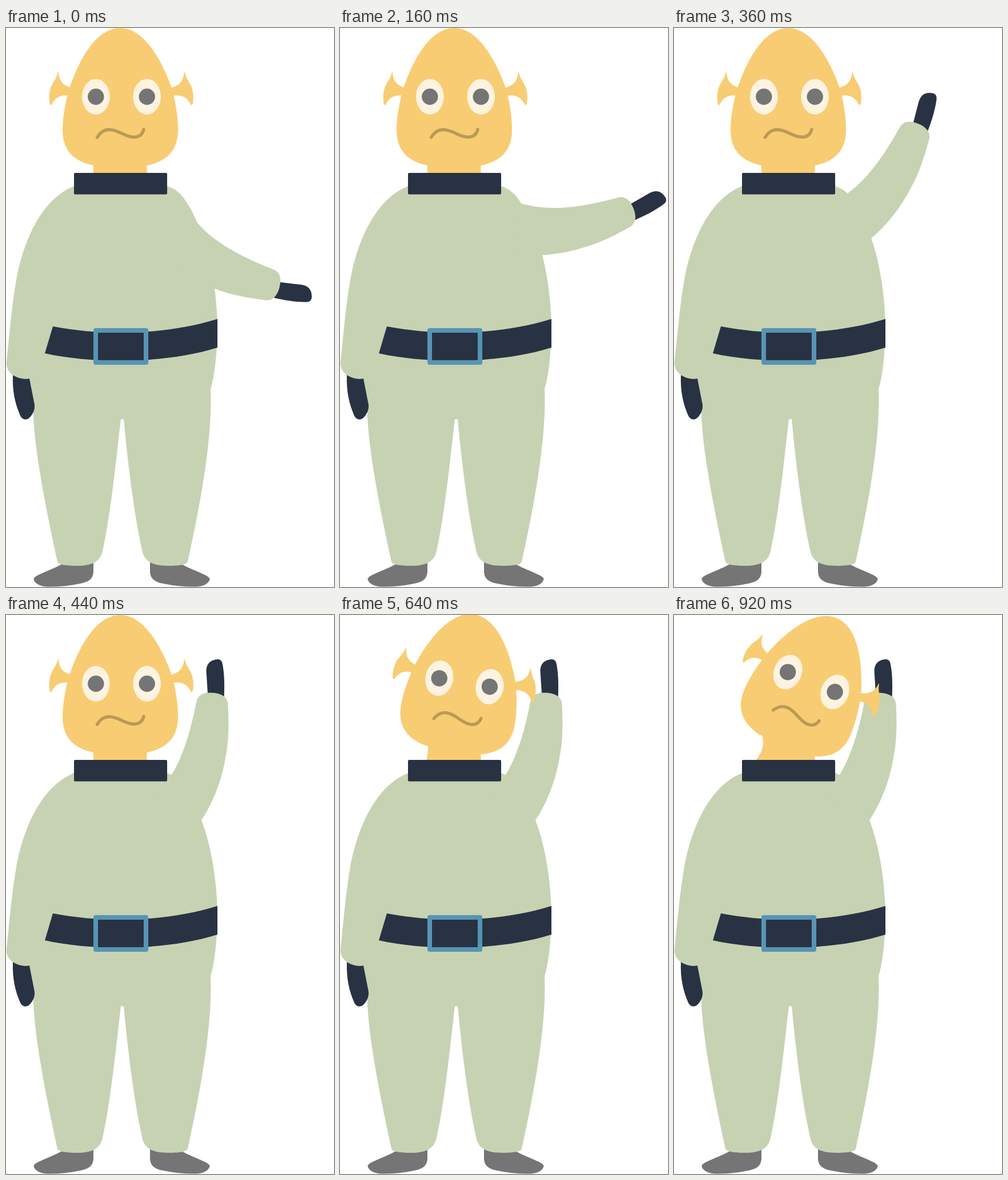
Write an HTML page that moves like this. It is 574 px wide and 976 px high and loops after 0.96 s.

```html
<!DOCTYPE html>
<html lang="en">
<head>
<meta charset="utf-8">
<title>Waving figure</title>
<style>
  html, body { margin: 0; width: 100%; height: 100%; overflow: hidden; background: #fff; }
  svg { display: block; width: 574px; height: 976px; }
  .suit { fill: #c7d2b3; }
  .navy { fill: #293243; }
  .skin { fill: #f8cc72; }
  .grey { fill: #757575; }
  .white { fill: #fdf3e1; }
  .buckle { fill: #293243; stroke: #5695b3; stroke-width: 8; stroke-linejoin: round; }
  .mouth { fill: none; stroke: #ba9a56; stroke-width: 5.4; stroke-linecap: round; }
</style>
</head>
<body>
<svg viewBox="0 0 574 976">
  <defs>
    <path id="shoe" class="grey" d="M153 930V950C152 962 145 967 130 970C110 974 90 976 72 975.5C56 975 48 967 48.5 961C53 954 76 948 100 935Z"/>
    <path id="ear" class="skin" d="M91 76.5C89 86 85 91 81 98C75 109 75 122 76.5 132C78 136 80 135 81 132C86 122 95 116.5 108 118H120V106L113 104C101 100 93 94 92 78Z"/>
    <g id="eye">
      <ellipse class="white" rx="24.3" ry="31"/>
      <circle class="grey" r="14.2"/>
    </g>
  </defs>

  <use href="#shoe"/>
  <use href="#shoe" transform="matrix(-1 0 0 1 405 0)"/>

  <path class="suit" d="M119 276C60 300 30 375 18 440C10 485 6 535 1 582C-1 596 9 604 13 607Q28 615 41 612L47 650L48 680C52 750 70 840 90 932C92 937 105 939 125 939C150 939 165 932 169 913C183 850 192 760 201 683H206C214 770 226 860 239 915C243 932 258 939 283 939C305 939 316 937 318 932C338 840 362 720 358 630C366 605 370 560 370 515C368 455 358 400 342 358C336 343 325 312 305 290Q295 280 282 276Z"/>
  <path class="navy" d="M12 606Q27 615 41 612L50 658C51 667 46 677 39 682C34 685 28 683 25 677C16 656 11 635 12 606Z"/>

  <g id="arm">
    <path class="navy" d="M462 436L481 444L515 448C530 449.5 535 458 535 468C535.5 475 532 478.5 525 478.5C507 478.5 490 476 464 470Z"/>
    <path class="suit" d="M318 322L334 339C363 374 412.5 400 468 421.5C477 425 482 434 480 445C478 462 470 476 456 475.5C420 471 390 465 365 455C330 443 290 420 263 393Z"/>
  </g>

  <path class="navy" d="M82 521C120 528 160 532 200 532C260 532 318 524 370 508V558C318 574 262 580 206 581C155 581 108 577 68 568Z"/>
  <rect class="buckle" x="157" y="528" width="88" height="56"/>

  <path id="neck" class="skin"/>
  <g id="head">
    <use href="#ear"/>
    <use href="#ear" transform="matrix(-1 0 0 1 403.5 0)"/>
    <path class="skin" d="M200 0C160 0 130 50 112 102C104 128 99 155 99 178C99 216 121 233 153 240H247C279 233 301 216 301 178C301 155 297 128 289 102C270 50 239 0 200 0Z"/>
    <use href="#eye" x="157.3" y="120"/>
    <use href="#eye" x="246.7" y="120"/>
    <path class="mouth" d="M159.5 191C166 181 172 177.5 181 177.5C197 177.5 208 190.5 224 190.5C234 190.5 239 185 241 177"/>
  </g>
  <rect class="navy" x="119" y="253" width="163" height="37.5" rx="2"/>
</svg>

<script>
const LOOP = 960, STEP = 40, TURN = 440;
const [arm, neck, head] = ["arm", "neck", "head"].map(id => document.getElementById(id));
const clamp = v => Math.min(1, Math.max(0, v));

// The arm swings up about the shoulder, drifting slightly outward mid-swing.
function poseArm(p) {
  const out = 4 * p * (1 - p);
  arm.setAttribute("transform",
    `translate(${7.5 * out} ${-3.5 * out}) rotate(${-100.3 * p} 288 343)`);
}

// The head tilts to the right and the neck bends after it.
function poseHead(p) {
  head.setAttribute("transform",
    `translate(0 ${3.2 * p - 4.4 * p * p}) rotate(${24.7 * p} 226.75 214)`);
  const foot = 153 - 10.5 * p * p, x = 153 + 2 * p, y = 240 - 30 * p;
  neck.setAttribute("d",
    `M246.5 256V205H${x}V${y}C${x + 3.5 * p} ${y + 16 * p} ${x} ${y + 28 * p} ${foot} 253V256Z`);
}

function draw(now) {
  const t = Math.floor((now % LOOP) / STEP) * STEP;
  poseArm(clamp(t / TURN));
  poseHead(clamp((t - TURN) / (LOOP - TURN)));
}

const start = performance.now();
function tick() {
  draw(performance.now() - start);
  requestAnimationFrame(tick);
}
tick();
</script>
</body>
</html>
```
